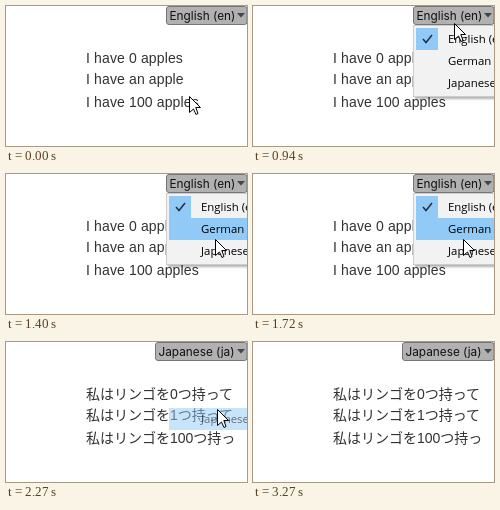
Recreate the animation shown at these times as an HTML page. Size 241 by 140 pixels, loop 4.37 s.

```html
<!DOCTYPE html>
<html lang="en">
<head>
<meta charset="utf-8">
<title>Language switch</title>
<style>
html, body { margin: 0; width: 100%; height: 100%; overflow: hidden; background: #fff; }
svg { display: block; width: 100%; height: 100%; }
#lines { font: 14px "Liberation Sans", "Noto Sans CJK JP", "Noto Sans CJK", sans-serif; fill: #323232; }
#lines.en { letter-spacing: .135px; }
#label { font: 11.8px Inter, sans-serif; fill: #111; }
.item { font: 11.4px "Open Sans", sans-serif; fill: #000; }
#menu { filter: drop-shadow(2px 2px 1px rgba(0, 0, 0, .3)); }
</style>
</head>
<body>
<svg viewBox="0 0 241 140">
  <g id="lines">
    <text x="80" y="57"></text>
    <text x="80" y="78"></text>
    <text x="80" y="101"></text>
  </g>
  <rect id="button" y=".5" height="18" rx="2.5" fill="#b1b1b1" stroke="#757575"/>
  <text id="label" y="14"></text>
  <path d="M231 7h8l-4 4.5z" fill="#444"/>
  <g id="menu">
    <rect x="160.5" y="19.5" width="90" height="71" fill="#f2f2f2" stroke="#ccc"/>
    <rect x="163" y="22" width="22" height="22" fill="#91c9f7"/>
  </g>
  <rect id="row" x="163" width="90" height="22" fill="#91c9f7"/>
  <g id="items">
    <path d="M170 33l3 3.5 6-7.5" fill="none" stroke="#1d2f45" stroke-width="1.5"/>
    <text class="item" x="195" y="37">English (en)</text>
    <text class="item" x="195" y="59">German (de)</text>
  </g>
  <text class="item" id="pick" x="195" y="81">Japanese (ja)</text>
  <path id="cursor" d="M.5 .5V16.5L4.5 13 7 18.5 9 17.5 6.8 11.5H11.5Z" fill="#fff" stroke="#000" stroke-linejoin="round"/>
</svg>
<script>
const $ = id => document.getElementById(id);
const LOOP = 4370, TICK = 78.1;
const OPEN = 11, CLOSE = 27, SWITCH = 28, GONE = 31;

const locales = {
  en: { label: "English (en)", left: 160.5,
        lines: ["I have 0 apples", "I have an apple", "I have 100 apples"] },
  ja: { label: "Japanese (ja)", left: 149.5,
        lines: ["私はリンゴを0つ持って", "私はリンゴを1つ持って", "私はリンゴを100つ持っ"] }
};

// Pointer path: tick, x, y
const path = [
  [0, 183, 90], [7, 192, 10], [8, 192, 10], [12, 201, 17], [15, 207, 53],
  [20, 210, 73], [21, 210, 73], [22, 210, 65], [25, 211, 67], [33, 211, 67],
  [37, 228, 115], [39, 228, 115], [42, 243, 145]
];

function pointer(n) {
  const i = path.findIndex(p => p[0] > n);
  if (i < 0) return path[path.length - 1].slice(1);
  const [t0, x0, y0] = path[i - 1], [t1, x1, y1] = path[i];
  let k = (n - t0) / (t1 - t0);
  if (i === 1) k = k * k * (3 - 2 * k);
  return [x0 + (x1 - x0) * k, y0 + (y1 - y0) * k];
}

const show = (id, on) => $(id).setAttribute("visibility", on ? "visible" : "hidden");

function setLocale(code) {
  const { label, left, lines } = locales[code];
  $("lines").setAttribute("class", code);
  [...$("lines").children].forEach((el, i) => el.textContent = lines[i]);
  $("label").textContent = label;
  $("label").setAttribute("x", left + 3);
  $("button").setAttribute("x", left);
  $("button").setAttribute("width", 241 - left);
}

let current;
function draw(t) {
  const n = Math.floor((t % LOOP) / TICK + .14);
  const code = n < SWITCH ? "en" : "ja";
  if (code !== current) setLocale(current = code);

  const [x, y] = pointer(n);
  $("cursor").setAttribute("transform", `translate(${Math.round(x)} ${Math.round(y)})`);

  const open = n >= OPEN && n < CLOSE;
  const fading = n >= CLOSE && n < GONE;
  const hover = Math.floor((y - 22) / 22);
  show("menu", open);
  show("items", open);
  show("row", fading || open && hover >= 0);
  show("pick", open || fading);
  $("row").setAttribute("y", 22 + 22 * hover);

  const alpha = fading ? 1 - (n - CLOSE) / (GONE - CLOSE) : 1;
  $("row").setAttribute("opacity", alpha);
  $("pick").setAttribute("opacity", alpha);
}

const start = performance.now();
function frame() {
  draw(performance.now() - start);
  requestAnimationFrame(frame);
}
frame();
</script>
</body>
</html>
```
